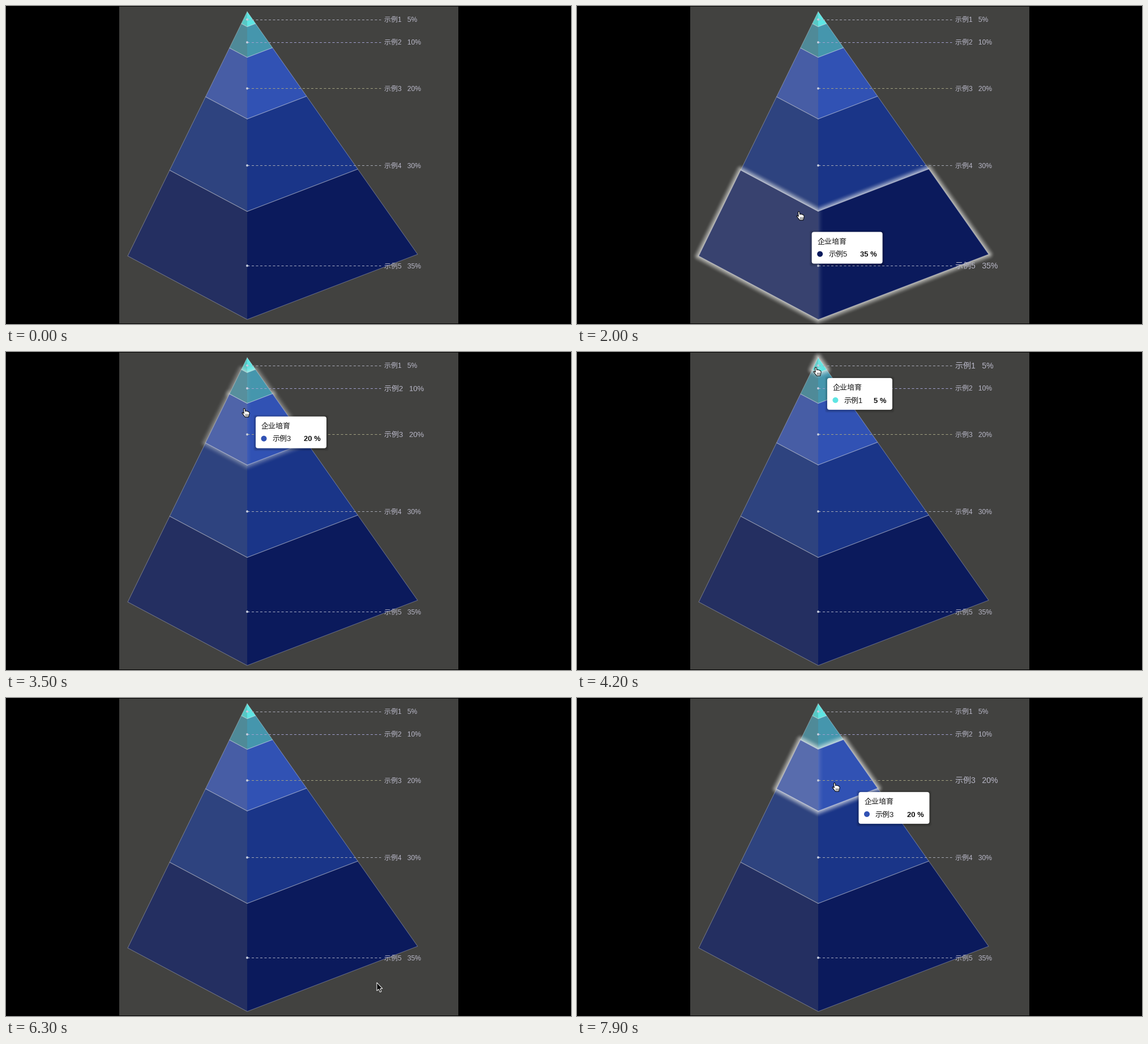
Recreate the animation shown at these times as a matplotlib script. Size 998 px wide and 561 px high, loop 8 s.

```python
import numpy as np
import matplotlib.pyplot as plt
from matplotlib.animation import FuncAnimation
from matplotlib.collections import LineCollection
from matplotlib.colors import to_rgb
from matplotlib.patches import Circle, FancyBboxPatch, Polygon, Rectangle
from matplotlib.path import Path

W, H, DPI = 998, 561, 100
FRAMES, STEP = 80, 100
PT = 72 / DPI
FONTS = ["Liberation Sans", "Noto Sans CJK JP"]

fig = plt.figure(figsize=(W / DPI, H / DPI), dpi=DPI, facecolor="black")
ax = fig.add_axes([0, 0, 1, 1])
ax.set_xlim(0, W)
ax.set_ylim(H, 0)
ax.axis("off")
ax.add_patch(Rectangle((200, 1), 599, 559, color="#424240", lw=0))

# The pyramid's three edges run straight from the apex
CX, TOP = 426, 10
SHARES = [5, 10, 20, 30, 35]
CUTS = np.array([0, 0.049, 0.1485, 0.3485, 0.649, 1])
LEFT = [(CX - 211 * c, TOP + 431 * c) for c in CUTS]
MID = [TOP + 543 * c for c in CUTS]
RIGHT = [(CX + 301 * c, TOP + 428 * c) for c in CUTS]

# right face, left face, guide line
COLORS = [
    ("#5ee5e3", "#58c8c5", "#a9a9b6"),
    ("#4596ad", "#4f8a98", "#a09fce"),
    ("#3152b4", "#475da5", "#a3a282"),
    ("#1a3588", "#2e437f", "#a6a9b2"),
    ("#0b1a5c", "#242f61", "#a8adc4"),
]

# Pointer path: (frame, x, y), straight between the stops
PATH = np.array([
    (1, 640, 545), (3, 783, 400), (6, 420, 2), (8, 204, 400), (10, 424, 24),
    (13, 424, 110), (16, 400, 425), (19, 395, 415), (20, 392, 363),
    (24, 424, 26), (26, 423, 330), (29, 422, 300), (30, 421, 200),
    (33, 421, 70), (37, 421, 130), (39, 422, 28), (43, 422, 27),
    (46, 420, 80), (49, 410, 330), (51, 310, 290), (53, 239, 311),
    (55, 250, 312), (57, 400, 260), (59, 500, 390), (61, 600, 460),
    (63, 655, 502), (64, 560, 520), (65, 312, 515), (66, 590, 512),
    (70, 770, 75), (73, 760, 522), (75, 780, 20), (77, 515, 155),
    (79, 455, 150),
])


def text(x, y, s, px, color, z, **kw):
    return ax.text(x, y, s, fontsize=px * PT, color=color, zorder=z,
                   family=FONTS, va="baseline", **kw)


class Glow:
    """Soft halo made of stacked translucent strokes."""
    RADII = np.arange(1, 12)

    def __init__(self, pts, strength, clip=None):
        self.alpha = strength * (1 - self.RADII / 12)
        self.lines = LineCollection([pts] * len(self.RADII),
                                    linewidths=2 * self.RADII * PT,
                                    capstyle="round", joinstyle="round")
        ax.add_collection(self.lines, autolim=False)
        if clip is not None:
            self.lines.set_clip_path(clip)

    def update(self, w, z):
        self.lines.set_visible(w > 0)
        self.lines.set_zorder(z)
        self.lines.set_color([(1, 1, 0.98, a * w) for a in self.alpha])


class Level:
    def __init__(self, i):
        self.value = SHARES[i]
        self.color, left, guide = COLORS[i]
        self.name = f"示例{i + 1}"
        self.y = y = (MID[i] + MID[i + 1]) / 2 + 0.5
        top, bottom = (CX, MID[i]), (CX, MID[i + 1])
        shape = [top, LEFT[i], LEFT[i + 1], bottom, RIGHT[i + 1], RIGHT[i], top]
        self.path = Path(shape)
        self.left = np.array(to_rgb(left))
        self.body = ax.add_patch(Polygon(shape, lw=0))
        self.face = ax.add_patch(Polygon(
            [top, bottom, RIGHT[i + 1], RIGHT[i]], fc=self.color, lw=0))
        self.edge, = ax.plot(*zip(*shape), color="white", alpha=0.3, lw=PT,
                             solid_joinstyle="round")
        self.halo = Glow(shape, 0.17)
        self.seam = Glow([top, bottom], 0.035, self.face)
        ax.plot([CX, 662], [y, y], color=guide, lw=PT, zorder=6,
                dashes=(4, 3.5), dash_capstyle="butt")
        ax.add_patch(Circle((CX, y), 2, color="#c3cadc", lw=0, zorder=6))
        self.label = text(668, y, f"{self.name}   {self.value}%", 12,
                          "#b9b8c8", 7)

    def update(self, w):
        z = 3 + w if w > 0 else 2
        self.halo.update(w, z - 0.05)
        self.body.set_facecolor(self.left + (1 - self.left) * 0.09 * w)
        self.body.set_zorder(z)
        self.face.set_zorder(z + 0.01)
        self.seam.update(w, z + 0.02)
        self.edge.set_zorder(z + 0.03)
        size = 12 + 2 * w
        self.label.set_fontsize(size * PT)
        self.label.set_y(self.y + 0.36 * size)


class Tooltip:
    def __init__(self):
        style = "round,pad=0,rounding_size=4"
        self.boxes = [FancyBboxPatch((0, 0), 1, 1, boxstyle=style, lw=0,
                                     fc="black", zorder=8) for _ in range(4)]
        self.boxes.append(FancyBboxPatch((0, 0), 1, 1, boxstyle=style, lw=0,
                                         fc="white", zorder=8.1))
        for box in self.boxes:
            ax.add_patch(box)
        self.dot = ax.add_patch(Circle((0, 0), 5, lw=0, zorder=9))
        self.title = text(0, 0, "企业培育", 13, "#111111", 9)
        self.name = text(0, 0, "", 13, "#111111", 9)
        self.value = text(0, 0, "", 13, "#111111", 9, ha="right", weight="bold")
        self.parts = [self.dot, self.title, self.name, self.value]

    def update(self, pos, level, alpha):
        for part in self.boxes + self.parts:
            part.set_visible(alpha > 0)
        if alpha <= 0:
            return
        x, y = pos
        width = 125 if level.value > 9 else 115
        for g, box in zip((4, 3, 2, 1, 0), self.boxes):
            box.set_bounds(x - g, y - g + (g > 0), width + 2 * g, 56 + 2 * g)
            box.set_alpha(alpha * (0.06 if g else 1))
        for part in self.parts:
            part.set_alpha(alpha)
        self.dot.center = (x + 14.5, y + 39)
        self.dot.set_facecolor(level.color)
        self.title.set_position((x + 10, y + 21.3))
        self.name.set_position((x + 29.5, y + 43.7))
        self.name.set_text(level.name)
        self.value.set_position((x + width - 10, y + 43.7))
        self.value.set_text(f"{level.value} %")


class Pointer:
    ARROW = np.array([(0, 0), (0, 14.5), (3.3, 11.6), (5.6, 16.8), (8, 15.8),
                      (5.8, 10.8), (10, 10.6)])
    HAND = np.array([(-1.6, 0.6), (-0.3, -0.6), (1, 0.6), (1.6, 4.6), (3, 4),
                     (6, 4.8), (8.6, 6.2), (9.2, 8), (7.6, 14.8), (1.4, 14.8),
                     (-4, 7.8), (-3.4, 6.5), (-0.7, 8.4)])

    def __init__(self):
        self.arrow = ax.add_patch(Polygon(self.ARROW, fc="black", ec="white",
                                          lw=PT, zorder=10))
        self.hand = ax.add_patch(Polygon(self.HAND, fc="white", ec="black",
                                         lw=PT, zorder=10))
        self.folds = LineCollection([], colors="black", linewidths=0.7 * PT,
                                    zorder=10.1)
        ax.add_collection(self.folds, autolim=False)

    def update(self, pos, hover, shown):
        self.arrow.set_visible(shown and not hover)
        self.hand.set_visible(shown and hover)
        self.folds.set_visible(shown and hover)
        self.arrow.set_xy(self.ARROW + pos)
        self.hand.set_xy(self.HAND + pos)
        self.folds.set_segments([np.array([(x, 9), (x, 12.5)]) + pos
                                 for x in (2.4, 4.4, 6.4)])


levels = [Level(i) for i in range(len(SHARES))]
tooltip = Tooltip()
pointer = Pointer()


def simulate():
    """Pointer, hover weights and trailing tooltip for every frame."""
    states = []
    weights = np.zeros(len(levels))
    tip, last = None, 0
    for i in range(FRAMES):
        pos = np.array([np.interp(i, PATH[:, 0], PATH[:, k]) for k in (1, 2)])
        hits = [k for k, lv in enumerate(levels)
                if i and lv.path.contains_point(pos)]
        goal = np.zeros(len(levels))
        if hits:
            last = hits[0]
            goal[last] = 1
            rest = pos + (20, 14)
            tip = rest if tip is None else tip + 0.5 * (rest - tip)
        weights = weights + np.clip(goal - weights, -0.5, 0.5)
        alpha = min(1, weights.sum()) if tip is not None else 0
        states.append((pos, bool(hits), weights, tip, last, alpha))
        if alpha == 0:
            tip = None
    return states


STATES = simulate()


def update(i):
    pos, hover, weights, tip, last, alpha = STATES[i]
    for level, w in zip(levels, weights):
        level.update(w)
    tooltip.update(tip, levels[last], alpha)
    pointer.update(pos, hover, i > 0)
    return []


anim = FuncAnimation(fig, update, frames=FRAMES, interval=STEP,
                     init_func=lambda: update(0), repeat=True, repeat_delay=0)
plt.show()
```
